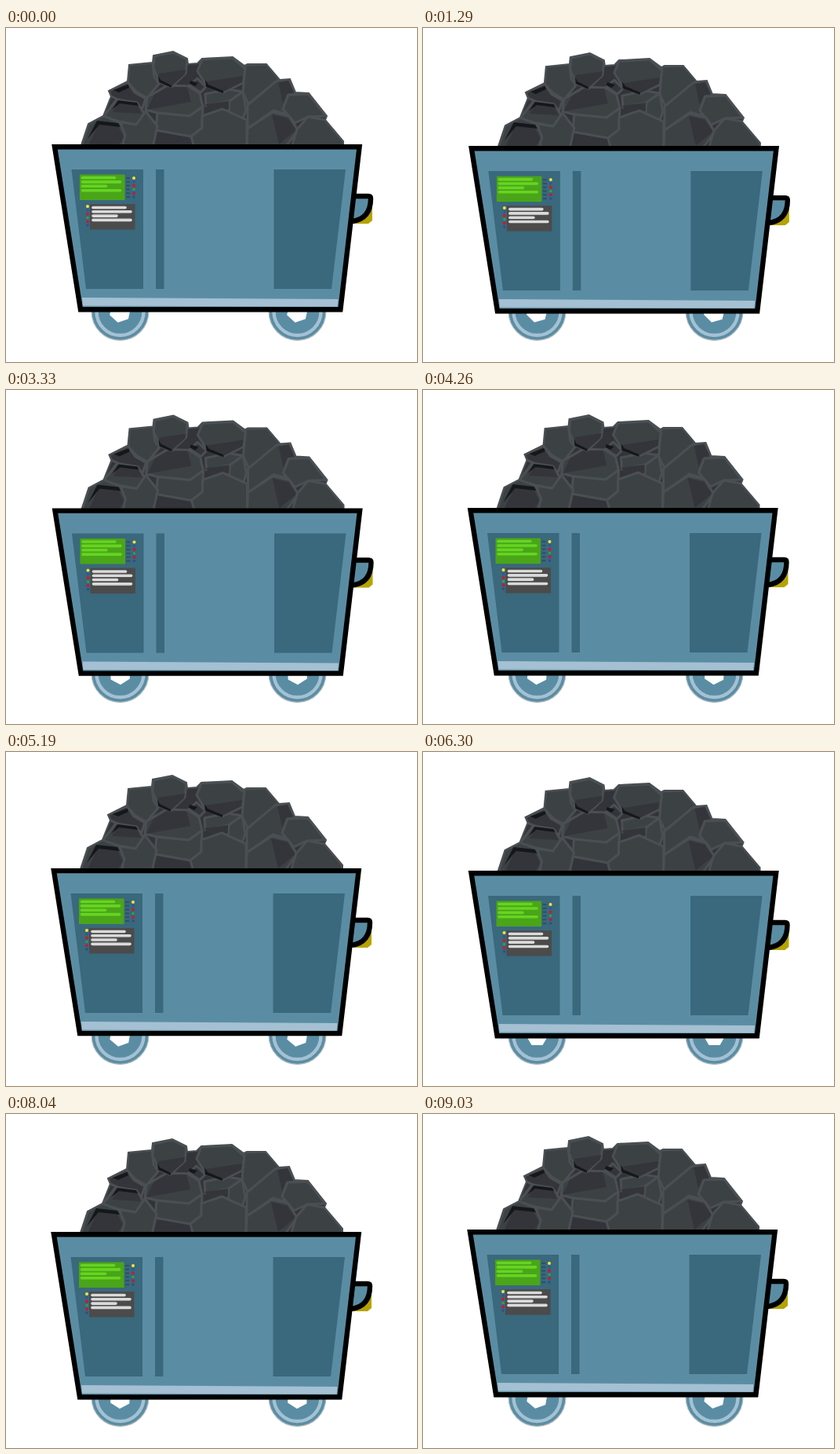
Animation, 524 px wide and 425 px high, one loop 9.06 s. Source, as an HTML page:

```html
<!DOCTYPE html>
<html lang="en">
<head>
<meta charset="utf-8">
<title>Coal cart</title>
<style>
html, body { margin: 0; width: 100%; height: 100%; overflow: hidden; background: #fff; }
svg { display: block; width: 524px; height: 425px; }
</style>
</head>
<body>
<svg viewBox="0 0 524 425">
  <defs>
    <g id="wheel">
      <circle r="36.4" fill="#5a8da3" stroke="#b4bcc0" stroke-width="1.2"/>
      <circle r="30" fill="none" stroke="#a4c1d4" stroke-width="4.4"/>
      <path class="hub" d="M14 0L7 12.1H-7L-14 0L-7-12.1H7Z" fill="#fff"/>
    </g>
    <path id="pile" d="M95 152L105 122L124 112L134 87L131 80L155 68L157 47L187 44L188 35L213 30L231 39L232 46L244 45L250 39L289 37L304 48L308 46L332 46L349 66L362 65L369 82L386 83L409 112L407 117L430 144L430 152Z"/>
    <clipPath id="rim"><use href="#pile"/></clipPath>
  </defs>
  <use href="#wheel" x="145.5" y="361"/>
  <use href="#wheel" x="371.5" y="361"/>

  <g id="cart">
    <use href="#pile" fill="#33343a" stroke="#4a4f53" stroke-width="2"/>
    <g id="coal" stroke-linejoin="round" clip-path="url(#rim)"></g>

    <path d="M443 228H467V245L462 249H443Z" fill="#b5a300"/>
    <path d="M440 214H462Q465 214 465 217Q465 243 441 246" fill="#5a8da3" stroke="#000" stroke-width="6.4"/>
    <path d="M62 151.2H450.6L426.4 358.2H95Z" fill="#5a8da3" stroke="#000" stroke-width="6.4"/>
    <path d="M97 343L423.5 345L422.5 354.5L98 353.5Z" fill="#a4c0d2"/>
    <path d="M83.5 180H175V332H102ZM191 180H201.5V332H191ZM341.5 180H433L415 332H341.5Z" fill="#3a687c"/>

    <rect x="94" y="186.5" width="57.5" height="32.5" fill="#4aa519"/>
    <rect x="107" y="224" width="57.5" height="32.5" fill="#4b4b4b"/>
    <g id="panel" stroke-width="3.6" stroke-linecap="round"></g>
  </g>
</svg>
<script>
const NS = 'http://www.w3.org/2000/svg';
const $ = id => document.getElementById(id);

function add(parent, tag, attrs) {
  const el = document.createElementNS(NS, tag);
  for (const k in attrs) el.setAttribute(k, attrs[k]);
  parent.append(el);
}

const FACE = '#3c4144', DARK = '#34353a', EDGE = '#4a4f53', CRACK = '#15181b';
const lump = (d, fill = FACE) => add($('coal'), 'path', { d: d + 'Z', fill, stroke: EDGE, 'stroke-width': 3 });
const shade = (d, fill = DARK) => add($('coal'), 'path', { d: d + 'Z', fill });

// Back rocks
lump('M157 47L187 44L189 62L195 71L180 89L166 81L155 69');
lump('M305 47L332 46L349 65L309 97L302 82');
lump('M308 98L344 68L361 65L369 83L355 109L341 105L308 128');
shade('M347 69L360 67L367 82L358 84L353 96');
lump('M131 80L155 69L164 82L178 90L174 102L143 91L134 87', DARK);
shade('M137 79L156 72L157 76L144 82', CRACK);
lump('M254 84L283 78L302 81L285 93L255 99');
lump('M285 93L302 81L306 104L300 122L284 106');
shade('M254 97L284 93L284 103L262 107');
lump('M234 73L244 64L255 75L248 82', DARK);
shade('M235 67L245 70L241 74L234 71', CRACK);

// Middle rocks
lump('M180 88L206 73L233 74L247 83L251 100L234 112L193 108L178 104');
shade('M180 104L189 85L206 75L231 75L236 94');
lump('M193 108L234 112L251 100L250 127L236 138L191 130');
lump('M250 112L276 103L307 117V152H240L236 138L250 127');
lump('M124 113L141 91L167 95L178 111L166 123L145 119');
shade('M136 107L144 95L168 97L173 109', DARK);
shade('M135 104L143 92L167 95L169 99L145 96', CRACK);

// Front rocks
lump('M147 120L166 123L178 106L193 125L187 152H150');
lump('M96 152L105 122L124 112L145 120L152 136L148 152');
shade('M105 150L118 122L143 125L150 139L143 150');
shade('M104 141L116 118L143 121L146 126L119 123', CRACK);
lump('M353 103L360 85L386 84L408 112L385 113L368 121');
lump('M308 128L340 107L361 112L372 130L356 152H307');
shade('M339 110L360 115L370 130L348 148');
lump('M371 129L385 113L407 117L430 144L430 152H364');
lump('M188 51L189 36L213 31L231 40L229 58L211 75L196 69');
shade('M195 58L229 53L228 59L211 74L196 67');
shade('M194 60L197 66L211 73L211 76L195 69', CRACK);
lump('M244 55L250 40L289 38L305 52L302 70L277 82L256 74');
shade('M256 68L302 61L301 69L277 81L257 74');
shade('M254 66L258 72L277 80L277 83L255 75', CRACK);

const panel = $('panel');
const line = (x, y, w, stroke) => add(panel, 'path', { d: `M${x} ${y}h${w}`, stroke });
const lights = ['#f5e532', '#2f55a0', '#d01828', '#2aa64a', '#c01c34', '#2c4c9c'];

[41, 48, 30, 48].forEach((w, i) => {
  line(97.5, 190.5 + i * 5.4, w, '#66d421');
  line(111, 228.5 + i * 5.3, w, '#dadada');
});
lights.forEach((fill, i) => {
  const y = i * 4.8, r = i % 2 ? 1.7 : 2;
  add(panel, 'circle', { cx: 163, cy: 191 + y, r, fill });
  add(panel, 'circle', { cx: 104, cy: 227 + y, r, fill });
  add(panel, 'rect', { x: 153, y: 190 + y, width: 5, height: 2, fill: '#2f4f68' });
});

// Linear interpolation through [time, value] pairs
function track(keys, t) {
  let i = 1;
  while (i < keys.length - 1 && t > keys[i][0]) i++;
  const [t0, a] = keys[i - 1], [t1, b] = keys[i];
  return a + (b - a) * (t - t0) / (t1 - t0);
}

const LOOP = 9060, STEP = 30, BOUNCE = LOOP / 12;
const sway = [[0, 0], [2460, -.3], [3330, .5], [3800, .5], [4600, -3], [5190, -1], [6300, -.5], [7400, .3], [8040, -1], [8400, -1.8], [9060, -2]];
const lift = [[0, .3], [2460, .7], [3330, 0], [5190, -.2], [6300, 1], [8040, -.1], [9060, -.75]];
const spin = [[0, 42], [2460, 390], [3330, 508], [5190, 760], [6300, 900], [8040, 1172], [9060, 1304]];
const hub = document.querySelector('.hub');

function draw(now) {
  const t = Math.floor(now % LOOP / STEP) * STEP;
  const x = track(sway, t);
  const y = 1.2 - 1.5 * Math.cos(2 * Math.PI * t / BOUNCE) + track(lift, t);
  $('cart').setAttribute('transform', `translate(${x} ${y})`);
  hub.setAttribute('transform', `rotate(${track(spin, t)})`);
}

const start = performance.now();
function tick() {
  draw(performance.now() - start);
  requestAnimationFrame(tick);
}
tick();
</script>
</body>
</html>
```
